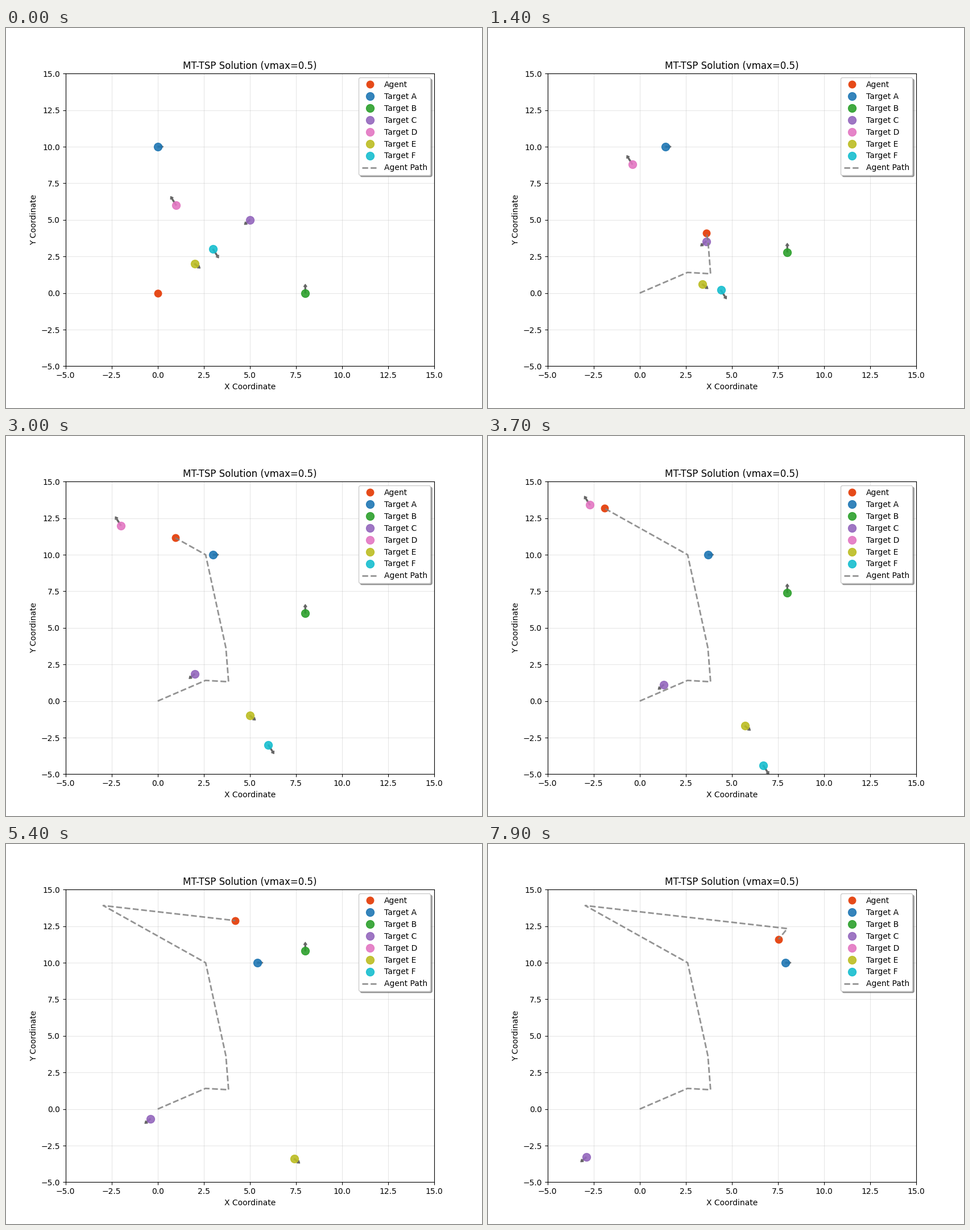
Animation, 837 px wide and 669 px high, one loop 8000 ms. Source, as a matplotlib script:

```python
import numpy as np
import matplotlib.pyplot as plt
from matplotlib.animation import FuncAnimation

FRAMES, STEP = 80, 100
CHASE_SPEED, RETURN_SPEED = 5.0, 0.5

# name: start, velocity, colour
TARGETS = {
    "A": ((0, 10), (1, 0), "tab:blue"),
    "B": ((8, 0), (0, 2), "tab:green"),
    "C": ((5, 5), (-1, -1.05), "tab:purple"),
    "D": ((1, 6), (-1, 2), "tab:pink"),
    "E": ((2, 2), (1, -1), "tab:olive"),
    "F": ((3, 3), (1, -2), "tab:cyan"),
}
TOUR = "EFCADB"

start = np.array([s for s, _, _ in TARGETS.values()], float)
vel = np.array([v for _, v, _ in TARGETS.values()], float)


def chase_time(pos, t, target, v):
    """Time for the agent to catch a target moving at constant velocity."""
    r = target + v * t - pos
    a, b, c = CHASE_SPEED**2 - v @ v, r @ v, r @ r
    return (b + np.sqrt(b * b + a * c)) / a


def plan_tour():
    times, points = [0.0], [np.zeros(2)]
    for name in TOUR:
        s, v = (np.array(p, float) for p in TARGETS[name][:2])
        t = times[-1] + chase_time(points[-1], times[-1], s, v)
        times.append(t)
        points.append(s + v * t)
    times.append(times[-1] + np.hypot(*points[-1]) / RETURN_SPEED)
    points.append(np.zeros(2))
    return np.array(times), np.array(points)


times, points = plan_tour()

# The small margin keeps the pixel size from being rounded down.
fig, ax = plt.subplots(figsize=(8.3701, 6.6901), dpi=100)
ax.set(xlim=(-5, 15), ylim=(-5, 15), xlabel="X Coordinate",
       ylabel="Y Coordinate", title="MT-TSP Solution (vmax=0.5)")
ax.grid(True, alpha=0.3)

agent, = ax.plot([], [], "o", color="#e64a19", ms=9, label="Agent")
dots = [ax.plot([], [], "o", color=c, ms=10, alpha=0.9, label=f"Target {n}")[0]
        for n, (_, _, c) in TARGETS.items()]
path, = ax.plot([], [], "--", color="gray", lw=2, alpha=0.85, label="Agent Path")
arrows = ax.quiver(*start.T, *(0.3 * vel).T, angles="xy", scale_units="xy",
                   scale=1, width=0.0031, headwidth=2.8, headlength=2,
                   headaxislength=2, color="#666666", edgecolor="#666666",
                   linewidth=1, zorder=1.5)
ax.legend(loc="upper right", shadow=True, framealpha=1)


def update(i):
    t = i * STEP / 1000
    pos = start + vel * t
    for dot, (x, y) in zip(dots, pos):
        dot.set_data([x], [y])
    arrows.set_offsets(pos)
    here = [np.interp(t, times, points[:, k]) for k in (0, 1)]
    agent.set_data([here[0]], [here[1]])
    trail = np.vstack([points[times <= t], here])
    path.set_data(*trail.T)
    return [agent, *dots, path, arrows]


anim = FuncAnimation(fig, update, frames=FRAMES, interval=STEP,
                     repeat=True, repeat_delay=0)
plt.show()
```
